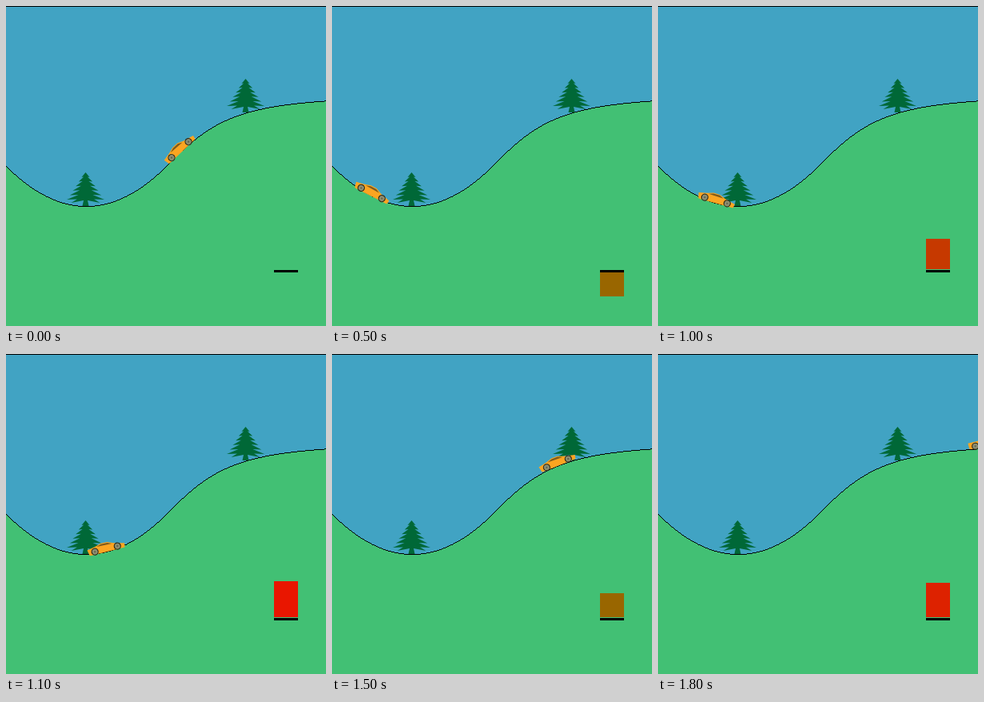
These frames come from a looping animation (400x400 px, 5000 ms). An HTML page with a canvas:

```html
<!DOCTYPE html>
<html lang="en">
<head>
<meta charset="utf-8">
<title>Car on the hill</title>
<style>
html, body { margin: 0; width: 100%; height: 100%; overflow: hidden; }
canvas { display: block; }
</style>
</head>
<body>
<canvas id="stage" width="400" height="400"></canvas>
<script>
const ctx = document.getElementById('stage').getContext('2d');
const STEP = 100, LOOP = 5000;
const MAX_SPEED = 3, GRAVITY = 9.81, THRUST = 4, REVERSE_STEPS = 3;

// Height of the hill and its first two derivatives
const hill = p => p < 0 ? p * p + p : p / Math.sqrt(1 + 5 * p * p);
const slope = p => p < 0 ? 2 * p + 1 : (1 + 5 * p * p) ** -1.5;
const bend = p => p < 0 ? 2 : -15 * p * (1 + 5 * p * p) ** -2.5;

const toX = p => 200 + 200 * p;
const toY = p => 200 - 200 * hill(p);

// The car backs down, then drives forward until it leaves the stage at p = 1
function simulate() {
  const states = [], dt = .0005;
  let p = .0875, s = -.02;
  while (p < 1) {
    states.push({ p, s });
    const force = states.length > REVERSE_STEPS ? THRUST : -THRUST;
    for (let t = 0; t < STEP / 1000 - dt / 2; t += dt) {
      const k = slope(p);
      s += dt * (force - GRAVITY * k - s * s * k * bend(p)) / (1 + k * k);
      p += dt * s;
    }
  }
  states.push({ p, s });
  return states;
}

function rect(color, x, y, w, h) {
  ctx.fillStyle = color;
  ctx.fillRect(x, y, w, h);
}

function poly(color, points) {
  ctx.fillStyle = color;
  ctx.beginPath();
  points.forEach(([x, y]) => ctx.lineTo(x, y));
  ctx.fill();
}

function disc(color, x, y, r) {
  ctx.fillStyle = color;
  ctx.beginPath();
  ctx.arc(x, y, r, 0, 2 * Math.PI);
  ctx.fill();
}

function drawLand() {
  rect('#41a3c3', 0, 0, 400, 400);
  rect('#000', 0, 0, 400, 1);
  for (let x = 0; x < 400; x++) {
    const y = Math.round(toY(x / 200 - 1));
    rect('#42c074', x, y, 1, 400 - y);
    rect('#000', x, y, 1, 1);
  }
}

function drawTree(p) {
  const half = [[0, 0]];
  for (let i = 0; i < 6; i++) {
    const x = 5 + 3.7 * i, y = 6 + 5.6 * i;
    half.push([x, y], [.45 * x, y - .5]);
  }
  half.push([18, 38], [2.5, 35], [4, 42]);
  ctx.save();
  ctx.translate(toX(p) - .5, Math.round(toY(p)) - 42);
  poly('#006837', half.concat(half.map(([x, y]) => [-x, y]).reverse()));
  ctx.restore();
}

function drawCar(p) {
  ctx.save();
  ctx.translate(toX(p), toY(p) - 3.2);
  ctx.rotate(-Math.atan(slope(p)));
  poly('#fca521', [[-22, 3], [-23.5, -4], [-13, -6], [-5, -8.4], [3, -8.2],
    [11, -4.8], [24, -1.5], [23, 3.5], [-20, 3.5]]);
  poly('#7d5a1c', [[-11, -5.4], [-5, -7.4], [3, -7.2], [8.5, -4.6]]);
  for (const x of [-14.5, 14.5]) {
    disc('#2a2614', x, 0, 4.6);
    disc('#8c8d70', x, 0, 3.5);
    disc('#5c5c48', x, 0, 1);
  }
  ctx.restore();
}

function drawGauge(speed) {
  const share = Math.abs(speed) / MAX_SPEED;
  const h = Math.floor(50 * share);
  const red = Math.floor(255 * share);
  rect(`rgb(${red}, ${255 - red}, 0)`, 335, speed > 0 ? 329 - h : 333, 30, h);
  rect('#000', 335, 330, 30, 3);
}

const states = simulate();
const start = performance.now();

function tick() {
  const i = Math.floor((performance.now() - start) % LOOP / STEP);
  const { p, s } = states[Math.min(i, states.length - 1)];
  drawLand();
  drawTree(-.5);
  drawTree(.5);
  drawCar(p);
  drawGauge(s);
  requestAnimationFrame(tick);
}
tick();
</script>
</body>
</html>
```
